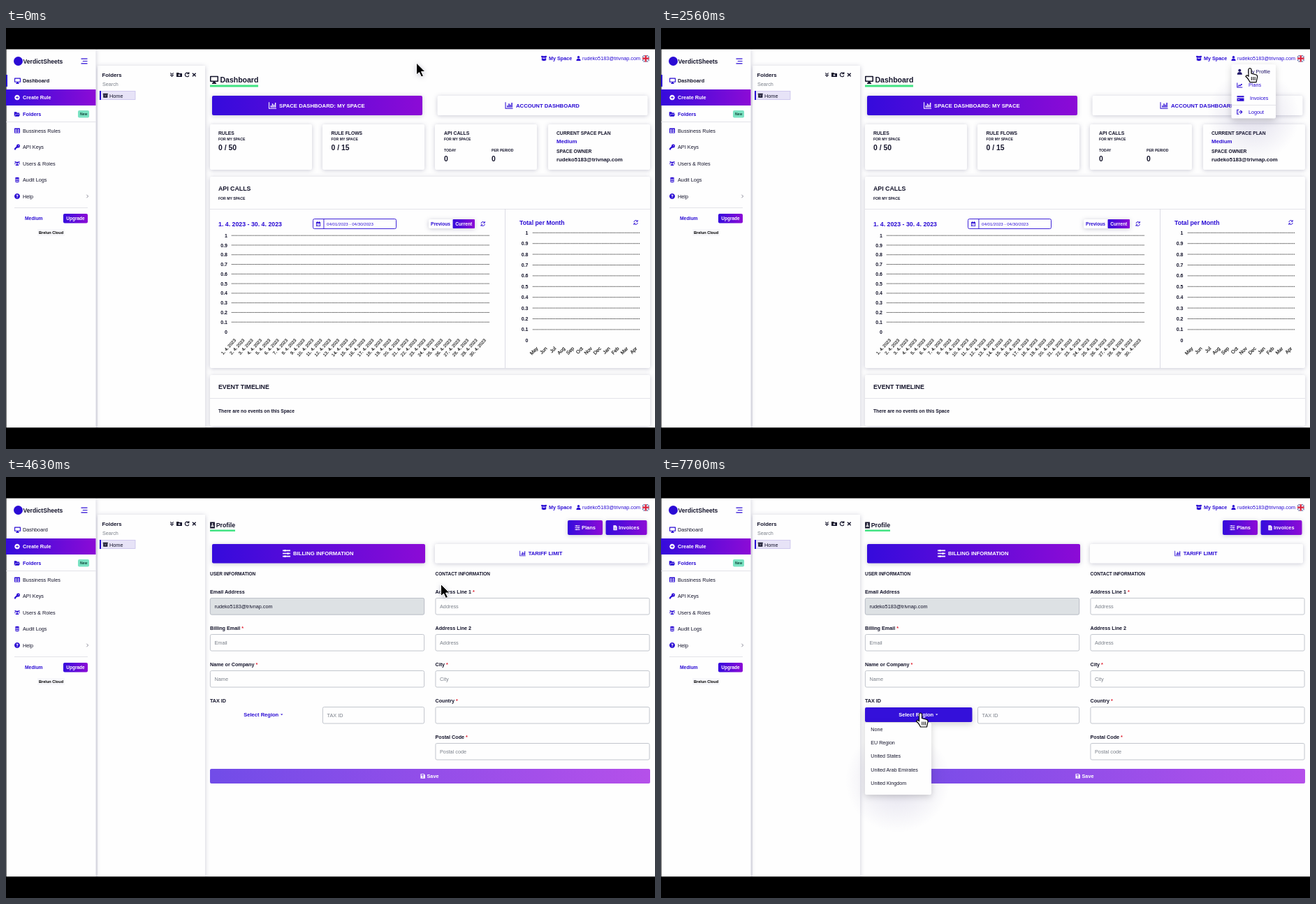
These frames come from a looping animation (929 px wide and 603 px high, 8 s). An HTML page:

```html
<!DOCTYPE html>
<html lang="en">
<head>
<meta charset="utf-8">
<title>Dashboard walkthrough</title>
<style>
html, body { margin: 0; height: 100%; overflow: hidden; background: #000; }
svg { display: block; }
text { font-family: "Liberation Sans", Arial, sans-serif; white-space: pre; }
.card { filter: drop-shadow(0 1px 3px #2a2a5a40); }
.menu { filter: drop-shadow(0 3px 5px #2223); }
</style>
</head>
<body>
<script>
const BLUE = '#2a0bd4', INK = '#14142b', GRAY = '#7b808a', GRAD = 'url(#grad)';
const EMAIL = 'rudeko5183@trivnap.com';

// Icons on a 16 x 16 grid; LINES are stroked, SOLID are filled.
const SOLID = {
  desk: 'M1 1h14q1 0 1 1v9q0 1-1 1h-5l.5 2H12v2H4v-2h1.5L6 12H1q-1 0-1-1V2q0-1 1-1zM2 3v7h12V3z',
  plus: 'M8 0a8 8 0 1 0 .01 0zM7 4h2v3h3v2H9v3H7V9H4V7h3z',
  folder: 'M0 2h6l2 2h6v3H4l-3 6H0zM4.500 8H16l-3 6H1.500z',
  table: 'M1 1h14q1 0 1 1v12q0 1-1 1H1q-1 0-1-1V2q0-1 1-1zM2 5v3h5V5zM9 5v3h5V5zM2 10v3h5v-3zM9 10v3h5v-3z',
  key: 'M11 0a5 5 0 1 1-1.500 9.800L8 11H6v2H4v3H0v-4l6.300-6.300A5 5 0 0 1 11 0zM12 3a1.200 1.200 0 1 0 .01 0z',
  users: 'M8 3a3 3 0 1 0 .01 0zM3 14q0-4 5-4t5 4zM3 2a2 2 0 1 0 .01 0zM13 2a2 2 0 1 0 .01 0zM0 10q0-3 3-3l1 1q-2 1-2 2zM16 10q0-3-3-3l-1 1q2 1 2 2z',
  data: 'M2 2.500q6-4 12 0v2q-6 3-12 0zM2 6.500q6 3 12 0v3q-6 3-12 0zM2 11.500q6 3 12 0v2q-6 4-12 0z',
  help: 'M8 0a8 8 0 1 0 .01 0zM5 6q0-3 3-3t3 3q0 1.500-2 2.500V10H7V7.500q2-.5 2-1.500 0-1-1-1T7 6zM7 11h2v2H7z',
  bars: 'M0 1h1.500v12.500H16V15H0zM4 8h2v4H4zM7 4h2v8H7zM10 6h2v6h-2zM13 2h2v10h-2z',
  trend: 'M0 1h2v12h14v2H0zM3 10l4-4 2 2 3-3-1-1h4v4l-1-1-5 4-2-2-3 3z',
  box: 'M2 7l6 2 6-2v6l-6 2-6-2zM0 3l2-2 6 1 6-1 2 2-2 3-5 1-1-3-1 3-5-1z',
  user: 'M8 0a4 4 0 1 0 .01 0zM1 16q0-7 5-7h4q5 0 5 7z',
  cal: 'M1 2h3V0h2v2h4V0h2v2h3v14H1zM3 6v8h10V6zM5 8h2v2H5zM9 8h2v2H9zM5 11h2v2H5z',
  card: 'M0 2h16v12H0zM0 5v2h16V5zM2 10v1h4v-1z',
  badge: 'M2 0h12v16H2zM8 3a2 2 0 1 0 .01 0zM4 12h8q0-4-4-4t-4 4z',
  file: 'M2 0h8l4 4v12H2zM5 6v1h6V6zM5 9v1h6V9zM5 12v1h6v-1z',
  save: 'M0 0h12l4 4v12H0zM3 2v4h8V2zM8 8a2.500 2.500 0 1 0 .01 0z',
  archive: 'M0 1h16v4H0zM1 6h14v9H1zM5 8v2h6V8z',
  addFolder: 'M0 2h6l2 2h8v10H0zM7 6v2H5v2h2v2h2v-2h2V8H9V6z',
  caret: 'M1 5h14l-7 7z'
};
const LINES = {
  sync: 'M2 7a6 6 0 0 1 11-3M14 0v5H9M14 9a6 6 0 0 1-11 3M2 16v-5h5',
  redo: 'M13 4a6 6 0 1 0 1 6M14 0v5H9',
  close: 'M3 3l10 10M13 3L3 13',
  down: 'M3 2l5 5 5-5M3 8l5 5 5-5',
  next: 'M5 2l6 6-6 6',
  menu: 'M0 2h16M4 8h12M0 14h16',
  sliders: 'M0 2h16M0 8h16M0 14h16M5 0v4M11 6v4M5 12v4',
  exit: 'M6 2H1v12h5M5 8h9M10 3l5 5-5 5'
};

// y is the middle of the capitals
const T = (x, y, s, size = 7.3, fill = INK, bold = true, extra = '') =>
  `<text x="${x}" y="${y + size * .36}" font-size="${size}" fill="${fill}" font-weight="${bold ? 700 : 400}" ${extra}>${s}</text>`;
const R = (x, y, w, h, fill, extra = '') =>
  `<rect x="${x}" y="${y}" width="${w}" height="${h}" fill="${fill}" ${extra}/>`;
const I = (name, cx, cy, size, color = BLUE, weight = 2.2) =>
  `<path transform="translate(${cx - size / 2} ${cy - size / 2}) scale(${size / 16})" ` + (SOLID[name]
    ? `d="${SOLID[name]}" fill="${color}" fill-rule="evenodd"/>`
    : `d="${LINES[name]}" fill="none" stroke="${color}" stroke-width="${weight}"/>`);
const card = (x, y, w, h, fill = '#fefefe') => R(x, y, w, h, fill, 'rx="2" class="card"');
const rule = (x, y, w, color = '#dcdce4') => R(x, y, w, .8, color);
const each = (list, draw) => list.map(draw).join('');
const group = (id, content) => `<g id="${id}">${content}</g>`;

function sidebar() {
  const items = [['table', 'Bussiness Rules'], ['key', 'API Keys'], ['users', 'Users &amp; Roles'], ['data', 'Audit Logs'], ['help', 'Help']];
  return R(0, 30, 128.5, 543, '#fefefe', 'class="card"') + R(0, 30, .8, 543, '#555') +
    `<circle cx="17.500" cy="47.500" r="6.500" fill="${BLUE}"/>` + T(24.5, 47.5, 'VerdictSheets', 8.6) +
    I('menu', 112, 47.5, 9, BLUE, 2) +
    I('desk', 16.5, 75.5, 9) +
    group('navActive', R(0, 67, 2, 17, BLUE) + T(24, 75.5, 'Dashboard')) +
    group('navPlain', T(24, 75.5, 'Dashboard', 7.3, INK, false)) +
    R(0, 88, 128.5, 23, GRAD) + I('plus', 16, 99.5, 7.5, '#fff') + T(24, 99.5, 'Create Rule', 7.3, '#fff') +
    I('folder', 16, 123.5, 8.5) + T(24, 123.5, 'Folders', 7.3, BLUE) +
    R(103, 118, 16, 10.5, '#7be3c3', 'rx="2"') + T(106, 123.3, 'New', 5, '#14463c') +
    rule(0, 134, 128.5) +
    each(items, ([icon, label], i) => I(icon, 16, 147 + i * 23.5, 8) + T(24, 147 + i * 23.5, label, 7.3, INK, false)) +
    I('next', 116.5, 241, 6, '#667', 2) +
    rule(12, 257, 105) + T(27, 272.5, 'Medium', 6.75, BLUE) +
    R(82, 266, 35, 13.5, GRAD, 'rx="2"') + T(86.3, 272.7, 'Upgrade', 6.5, '#fff') +
    R(45, 288, 39, 10, '#f7f7fa') + T(47, 293, 'Brelun Cloud', 5.6, '#000');
}

function folders() {
  return R(131, 54, 154, 520, '#fefefe', 'class="card"') +
    T(137.5, 67, 'Folders', 7.8) + T(138, 80, 'Search', 7.2, GRAY, false) +
    I('down', 237.5, 67, 7, INK, 2.6) + I('addFolder', 248, 67, 8, INK) +
    I('redo', 259, 67, 7.5, INK, 2.6) + I('close', 269.3, 67, 7.5, INK, 3) +
    R(134.5, 90.5, 50.5, 12, '#e7e3f7', 'stroke="#c9c1ec" stroke-width=".8"') + R(134, 90, 2, 13, BLUE) +
    I('archive', 142.3, 96.7, 7, INK) + T(148, 97, 'Home', 7.3, INK, false);
}

function header() {
  return I('box', 770, 43.5, 8.5) + T(777, 43.5, 'My Space', 7.2, BLUE) +
    I('user', 819.5, 43.5, 7) + T(825, 43.5, EMAIL, 7.24, BLUE, false) +
    group('underline', R(825, 47, 83, .8, BLUE)) +
    R(911, 39, 9.5, 9.5, '#2b3b86', 'rx="2"') +
    '<path d="M911.500 39.500l8.500 8.500m0-8.500l-8.500 8.500" stroke="#fff" stroke-width="1.500"/>' +
    '<path d="M915.700 39v9.500M911 43.700h9.500" stroke="#fff" stroke-width="3.600"/>' +
    '<path d="M915.700 39v9.500M911 43.700h9.500" stroke="#d8203a" stroke-width="2.200"/>';
}

function chart(x0, x1, top, step, labelX) {
  return each([...Array(11).keys()], i => {
    const y = top + i * step, label = i % 10 ? (1 - i / 10).toFixed(1) : 1 - i / 10;
    return T(labelX, y, label, 7, INK, true, 'text-anchor="end"') +
      (i < 10 ? `<path d="M${x0} ${y}H${x1}" stroke="#333" stroke-dasharray="1.300 .9"/>` : '');
  });
}
const slanted = (x, y, s, size, angle) =>
  `<text transform="translate(${x} ${y}) rotate(${angle})" font-size="${size}" text-anchor="end" fill="#111" stroke="#111" stroke-width=".15">${s}</text>`;

function dashboard() {
  const days = [...Array(30).keys()];
  const months = 'May Jun Jul Aug Sep Oct Nov Dec Jan Feb Mar Apr'.split(' ');
  const sub = (x, y, s = 'FOR MY SPACE') => T(x, y, s, 5.1);
  return I('desk', 298, 74, 12, INK) + T(306.5, 74.5, 'Dashboard', 10.5) + R(292, 81.5, 69, 3, '#42e383') +
    R(295, 97, 301, 28, GRAD, 'rx="2" class="card"') + I('bars', 381.5, 111, 11, '#fff') + T(391, 111, 'SPACE DASHBOARD: MY SPACE', 7.72, '#fff') +
    card(617.5, 97, 301, 28) + I('bars', 720, 111, 11) + T(730, 111, 'ACCOUNT DASHBOARD', 7.72, BLUE) +
    each([292, 453, 614, 776], x => card(x, 138, 146, 65)) +
    T(304, 151, 'RULES', 6.75) + sub(304, 159.3) + T(304, 171, '0 / 50', 10.4) +
    T(465.5, 151, 'RULE FLOWS', 6.75) + sub(465.5, 159.3) + T(465.5, 171, '0 / 15', 10.4) +
    T(627, 151, 'API CALLS', 6.9) + sub(627, 159.3) + sub(627, 175, 'TODAY') + sub(695, 175, 'PER PERIOD') +
    T(627, 187, '0', 10.4) + T(695, 187, '0', 10.4) +
    T(788, 151, 'CURRENT SPACE PLAN', 6.72) + T(788, 162, 'Medium', 7.8, BLUE) +
    T(788, 177, 'SPACE OWNER', 6.72) + T(788, 188.5, EMAIL, 7.75) +
    card(292, 213, 630, 274) + T(304, 230, 'API CALLS', 8.8) + sub(304, 244.5) +
    rule(292, 259, 630) + R(714, 259, .8, 228, '#d4d4de') +
    T(304, 280.5, '1. 4. 2023 - 30. 4. 2023', 8.8, BLUE) +
    R(439.5, 273.5, 119, 14, '#fefefe', `rx="2" stroke="${BLUE}" stroke-width=".9"`) + R(454.5, 273.5, .9, 14, BLUE) +
    I('cal', 447, 280.5, 7) + T(459, 280.5, '04/01/2023 - 04/30/2023', 6.15, BLUE, false) +
    card(605, 274, 66, 13) + T(608, 280.5, 'Previous', 6.6, BLUE) + R(639.5, 274, 31.5, 13, GRAD, 'rx="1"') + T(643.3, 280.5, 'Current', 6.6, '#fff') +
    I('sync', 682.7, 280.5, 7) + I('sync', 901.5, 278.5, 7) +
    T(735, 278.5, 'Total per Month', 8.7, BLUE) +
    chart(323, 692, 297.2, 13.78, 317) + chart(754, 908, 293.3, 15.4, 747.5) +
    each(days, i => slanted(329.5 + i * 12.34, 447.5, `${i + 1}. 4. 2023`, 6.3, -48)) +
    each(months, (m, i) => slanted(762 + i * 12.9, 459.5, m, 7, -45)) +
    card(292, 497, 630, 73) + T(304, 513.5, 'EVENT TIMELINE', 8.8) + rule(292, 530, 630) +
    T(304, 548.3, 'There are no events on this Space', 6.72);
}

function profile() {
  return I('badge', 295.5, 69, 9, INK) + T(300.7, 69, 'Profile', 8.8) + R(292, 75.5, 36, 2.5, '#42e383') +
    R(804, 62, 50, 21, GRAD, 'rx="2" class="card"') + I('sliders', 818, 72.7, 7, '#fff') + T(824, 72.7, 'Plans', 7.5, '#fff') +
    R(858.5, 62, 59, 21, GRAD, 'rx="2" class="card"') + I('file', 872, 72.7, 7, '#fff') + T(877, 72.7, 'Invoices', 7.4, '#fff') +
    R(295, 96, 305, 27.5, GRAD, 'rx="2" class="card"') + I('sliders', 401.5, 109.5, 11, '#fff') + T(411, 109.7, 'BILLING INFORMATION', 7.7, '#fff') +
    card(614, 96, 305, 27.5) + I('bars', 739.5, 109.5, 8.5) + T(747.7, 109.7, 'TARIFF LIMIT', 7.65, BLUE);
}

function field(x, row, label, hint, required) {
  const y = 164 + row * 52, star = required ? ' <tspan fill="#e02030">*</tspan>' : '';
  return T(x, y, label + star, 7.2) + input(x, row, 307, hint);
}
const input = (x, row, w, hint) =>
  R(x + .4, 173.5 + row * 52, w - .8, 23.5, '#fefefe', 'rx="2" stroke="#bcc0c8" stroke-width=".9"') +
  T(x + 6.5, 185.5 + row * 52, hint, 7.3, GRAY, false);
const region = color => T(340.3, 340.5, 'Select Region', 7.55, color) + I('caret', 394.7, 340.3, 4, color);

function form() {
  return T(292, 138.3, 'USER INFORMATION', 6.5) + T(614.5, 138.3, 'CONTACT INFORMATION', 6.5) +
    field(292, 0, 'Email Address', '') + R(292.4, 173.5, 306.2, 23.5, '#dde1e4', 'rx="2" stroke="#bcc0c8" stroke-width=".9"') +
    T(298.5, 185.5, EMAIL, 7.24, INK, false) +
    field(292, 1, 'Billing Email', 'Email', true) + field(292, 2, 'Name or Company', 'Name', true) +
    T(292, 320, 'TAX ID', 7.2) + input(453, 3, 146, 'TAX ID') + region(BLUE) +
    field(614.5, 0, 'Address Line 1', 'Address', true) + field(614.5, 1, 'Address Line 2', 'Address') +
    field(614.5, 2, 'City', 'City', true) + field(614.5, 3, 'Country', '', true) + field(614.5, 4, 'Postal Code', 'Postal code', true) +
    R(292, 418, 630, 21, 'url(#soft)', 'rx="2"') + I('save', 596.7, 428.5, 6.5, '#fff') + T(602.5, 428.5, 'Save', 7.3, '#fff') +
    group('regionHover', R(292, 330, 153.5, 21, '#3410da', 'rx="2" class="menu"') + region('#fff'));
}

const glow = (x, y, r) => `<circle cx="${x}" cy="${y}" r="${r}" fill="url(#glow)"/>`;

function userMenu() {
  const items = [['user', 840, 'My Profile', '#1c1066'], ['trend', 841, 'Plans', BLUE], ['card', 843, 'Invoices', BLUE], ['exit', 841, 'Logout', BLUE]];
  return glow(848, 125, 66) + R(816.5, 52, 63.5, 77.5, '#fefefe', 'rx="2" class="menu"') + rule(817, 110, 63) +
    each(items, ([icon, x, label, color], i) => I(icon, icon == 'card' ? 829.5 : 828.3, 62.7 + i * 19.2, icon == 'card' ? 10 : 8, color) +
      T(x, 62.5 + i * 19.2, label, 7.2, color, false));
}

function regionMenu() {
  const items = ['None', 'EU Region', 'United States', 'United Arab Emirates', 'United Kingdom', 'Australia ABN'];
  return glow(339, 434, 75) + R(292, 352, 95, 103, '#fefefe', 'rx="2" class="menu"') +
    `<svg x="292" y="352" width="95" height="103">${each(items, (s, i) => T(8.3, 9.7 + i * 19.1, s, 7.15, INK, false))}</svg>`;
}

const stops = (a, b) => `<stop stop-color="${a}"/><stop offset="1" stop-color="${b}"/>`;
document.body.innerHTML = `<svg width="929" height="603" viewBox="0 0 929 603">
  <defs>
    <linearGradient id="grad">${stops('#350bdc', '#8c0bd6')}</linearGradient>
    <linearGradient id="soft">${stops('#714ce8', '#b550ea')}</linearGradient>
    <radialGradient id="glow"><stop offset=".3" stop-color="#41358a" stop-opacity=".11"/><stop offset="1" stop-color="#41358a" stop-opacity="0"/></radialGradient>
  </defs>` +
  R(0, 30, 929, 543, '#fefefe') + folders() + sidebar() + header() +
  group('dashboard', dashboard()) + group('profile', profile()) + group('form', form()) +
  group('userMenu', userMenu()) + group('regionMenu', regionMenu()) +
  group('status', R(0, 561.5, 309.5, 11, '#d9cbc3', 'stroke="#a89c96" stroke-width=".7"') + T(2.5, 567, 'https://app.verdictsheets.io/profile', 6.5, '#222', false)) +
  R(0, 0, 929, 30.5, '#000') + R(0, 572.3, 929, 31, '#000') +
  group('cursor',
    group('arrow', '<path d="M0 0v17l4-3.500 3 6.500 3-1.300-3-6.200h5.500z" fill="#000" stroke="#fff" class="card"/>') +
    group('hand', '<path d="M-2 1.500q2-3 4 0v6l7 2q2 .8 1.600 3L9 20H0q-3-6-6-8 1-3 4-.5z" fill="#fff" stroke="#000" stroke-width="1.200"/><path d="M2.300 12.500v5M4.800 12.500v5M7.200 12.500v5" stroke="#000"/>')) +
  '</svg>';

// Pointer path: time, x, y
const PATH = [[0, 587.5, 50], [400, 587.5, 50], [960, 821.5, 56], [1200, 837, 45], [2300, 837, 45], [2560, 843, 57.5], [2730, 842.5, 60.5],
  [3460, 842.5, 60.5], [4000, 764.5, 76.5], [4280, 668, 121], [4630, 622.5, 153.5], [6560, 622.5, 153.5], [7300, 371.5, 338], [8000, 371.5, 338]];

// Monotone cubic interpolation: rests stay still, moves never overshoot.
function along(t, axis) {
  const i = Math.max(1, PATH.findIndex(p => p[0] > t)), a = PATH[i - 1], b = PATH[i];
  const slope = k => PATH[k] && PATH[k - 1] ? (PATH[k][axis] - PATH[k - 1][axis]) / (PATH[k][0] - PATH[k - 1][0]) : 0;
  const tangent = (p, q) => p * q > 0 ? 2 * p * q / (p + q) : 0;
  const d = b[0] - a[0], u = (t - a[0]) / d, s = slope(i);
  const m0 = tangent(slope(i - 1), s) * d, m1 = tangent(s, slope(i + 1)) * d;
  return a[axis] + (b[axis] - a[axis]) * u * u * (3 - 2 * u) + m0 * u * (1 - u) ** 2 - m1 * u * u * (1 - u);
}

const ramp = (t, from, to) => Math.min(1, Math.max(0, (t - from) / (to - from)));
const el = id => document.getElementById(id);
const show = (id, amount) => { el(id).style.opacity = +amount; };

function draw(t) {
  const x = along(t, 1), y = along(t, 2), onProfile = t >= 3040;
  const overRegion = t > 6560 && x < 446 && y > 330;
  const hand = (t >= 1215 && t < 3060) || overRegion;
  show('navActive', !onProfile);
  show('navPlain', onProfile);
  show('dashboard', !onProfile);
  show('profile', onProfile);
  show('form', t >= 3220);
  show('underline', t >= 1140 && t < 2360);
  show('userMenu', t >= 1630 ? 1 - ramp(t, 3190, 3260) : 0);
  show('status', t >= 2960 && t < 3620);
  show('regionHover', overRegion);
  show('regionMenu', ramp(t, 7590, 7690));
  show('hand', hand);
  show('arrow', !hand);
  const scale = 1 - .55 * (ramp(t, 2930, 3060) - ramp(t, 3170, 3260));
  el('cursor').setAttribute('transform', `translate(${x} ${y}) scale(${scale})`);
}

function tick() {
  draw(performance.now() % 8000);
  requestAnimationFrame(tick);
}
tick();
</script>
</body>
</html>
```
